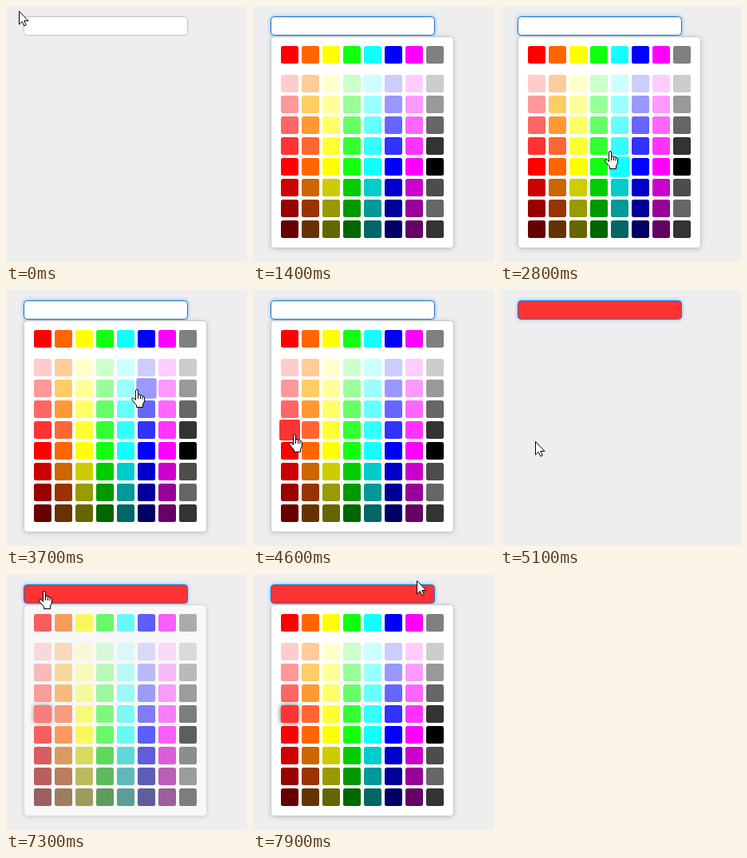
An HTML page with a canvas that plays this animation: 302 by 320 pixels, repeating every 8 s.

```html
<!DOCTYPE html>
<html lang="en">
<head>
<meta charset="utf-8">
<title>Colour picker</title>
<style>
  html, body { margin: 0; width: 100%; height: 100%; overflow: hidden; background: #eee; }
  canvas { display: block; width: 302px; height: 320px; }
</style>
</head>
<body>
<canvas id="stage" width="302" height="320"></canvas>
<script>
const W = 302, H = 320, LOOP = 8000, STEP = 100, CELL = 22, PITCH = 26;
const PICK = 4800, BLUR = 5300, REFOCUS = 6900;
const stage = document.getElementById('stage').getContext('2d');
const layer = new OffscreenCanvas(W, H).getContext('2d');

// Channels in fifths of full strength.
const HUES = [[5, 0, 0], [5, 2, 0], [5, 5, 0], [.35, 5, .35], [.35, 5, 5], [0, 0, 5], [5, 0, 5]];
const rgb = levels => `rgb(${levels.map(v => Math.round(v * 51))})`;

// Positive tone lightens towards white, negative darkens.
function toned(base, tone, lift) {
  if (tone < 0) return Math.round(base * (5 + tone) / 5);
  if (base < 1) return Math.max(base, Math.round(tone * lift));
  return Math.min(5, Math.floor(base + tone * .67));
}

function colorOf(col, row) {
  const tone = row ? 5 - row : 0;
  const hue = HUES[col];
  if (hue) return rgb(hue.map(base => toned(base, tone, hue[1] === 2 ? .7 : 1)));
  const grey = !row ? 2.5 : tone < 0 ? [1.5, 2, 1][-1 - tone] : tone;
  return rgb([grey, grey, grey]);
}

const cells = Array.from({ length: 72 }, (_, i) => {
  const col = i % 8, row = Math.floor(i / 8);
  return {
    x: 35 + col * PITCH,
    y: row ? 60 + row * PITCH : 50,
    color: colorOf(col, row),
    pickable: row === 4 && col === 0
  };
});

// Pointer journeys: [time, x, y]; the pointer is away between them.
const tracks = [
  [[0, 16, 6], [400, 42, 18], [1100, 80, 18]],
  [[1700, 2, 272], [2200, 150, 240], [2780, 147, 196], [2800, 137, 181],
   [3500, 176, 118], [4500, 51, 180], [5000, 51, 180], [5500, -14, 262]],
  [[6400, 13, 27], [6800, 47, 21], [7300, 47, 21], [7900, 205, 8], [8000, 205, 8]]
];

const clamp = v => Math.max(0, Math.min(1, v));
const ease = u => u * u * (3 - 2 * u);
const inside = (p, x, y, w, h) => p.x >= x && p.x < x + w && p.y >= y && p.y < y + h;

function pointerAt(t) {
  const track = tracks.find(k => t >= k[0][0] && t < k[k.length - 1][0]);
  if (!track) return null;
  const i = track.findIndex(k => k[0] > t);
  const [t0, x0, y0] = track[i - 1], [t1, x1, y1] = track[i];
  const u = ease((t - t0) / (t1 - t0));
  return { x: Math.round(x0 + (x1 - x0) * u), y: Math.round(y0 + (y1 - y0) * u) };
}

const fadeIn = (t, from) => clamp((t - from) / 150);
const popupAlpha = t => t < REFOCUS ? fadeIn(t, 710) * (1 - fadeIn(t, 4910)) : fadeIn(t, 7210);

// Share of the last moments spent over the cell.
function hoverAmount(cell, trail) {
  return trail.filter(p => p && inside(p, cell.x, cell.y, CELL, CELL)).length / trail.length;
}

function shadow(ctx, color, blur, dy = 0) {
  ctx.shadowColor = color;
  ctx.shadowBlur = blur;
  ctx.shadowOffsetY = dy;
}

// Filled rounded box with an optional [color, blur, dy] shadow and a border.
function drawBox(ctx, x, y, w, h, r, fill, shade, border) {
  ctx.save();
  ctx.beginPath();
  ctx.roundRect(x, y, w, h, r);
  ctx.fillStyle = fill;
  if (shade) shadow(ctx, ...shade);
  ctx.fill();
  shadow(ctx, 'transparent', 0);
  if (border) {
    ctx.strokeStyle = border;
    ctx.stroke();
  }
  ctx.restore();
}

function drawInput(color, focused) {
  const shade = focused ? ['rgba(70,165,255,.95)', 5] : ['rgba(0,0,0,.16)', 2];
  drawBox(stage, 22.5, 13.5, 205, 23, 4, color, shade, focused ? '#1c74d0' : '#c8c8c8');
}

function drawPopup(t, alpha) {
  layer.clearRect(0, 0, W, H);
  drawBox(layer, 22.5, 38.5, 229, 264, 4, '#fff', ['rgba(0,0,0,.2)', 7, 1], '#c8c8c8');
  const trail = [0, 20, 40, 60, 80, 100].map(d => pointerAt(t - d));
  cells.map(cell => ({ cell, grow: hoverAmount(cell, trail) }))
    .sort((a, b) => a.grow - b.grow)
    .forEach(({ cell, grow }) => {
      const out = 2 * grow, size = CELL + 2 * out;
      const shade = cell.pickable && t >= PICK && ['rgba(0,0,0,.65)', 6];
      drawBox(layer, cell.x - out, cell.y - out, size, size, 2.5, cell.color, shade);
    });
  stage.globalAlpha = alpha;
  stage.drawImage(layer.canvas, 0, 0);
  stage.globalAlpha = 1;
}

const arrow = new Path2D('M.5 .5V17L4.3 13.4 6.8 18.8 9.2 17.8 6.8 12.5H12Z');
const hand = new Path2D('M5.5 13.5V2Q5.5 .5 7 .5T8.5 2V8Q8.5 6.5 10 6.5T11.5 8.3Q11.5 7.4 12.8 7.4T14 9.2' +
  'Q14 8.7 15.2 8.9T16.5 11V15L14.5 19V22.5H6.5V20L3 16 .7 12.8Q.4 10.8 2.2 10.9Q3.5 11 5.5 13.5Z');
const knuckles = new Path2D('M8.5 8V12M11.5 8.5V12M14 9.5V12.5');

function drawPointer(p, open) {
  const pointing = inside(p, 22, 13, 206, 24) || (open && inside(p, 22, 38, 230, 265));
  const shape = pointing ? hand : arrow;
  stage.save();
  stage.translate(p.x - (pointing ? 6 : 0), p.y);
  stage.fillStyle = '#fff';
  stage.strokeStyle = '#000';
  stage.lineJoin = 'round';
  stage.fill(shape);
  stage.stroke(shape);
  if (pointing) stage.stroke(knuckles);
  stage.restore();
}

function draw(t) {
  stage.fillStyle = '#eee';
  stage.fillRect(0, 0, W, H);
  const alpha = popupAlpha(t), p = pointerAt(t);
  drawInput(t >= PICK ? '#f33' : '#fff', (t >= 500 && t < BLUR) || t >= REFOCUS);
  if (alpha > 0) drawPopup(t, alpha);
  if (p) drawPointer(p, alpha > 0);
}

const start = performance.now();
function tick() {
  const t = (performance.now() - start) % LOOP;
  draw(Math.floor(t / STEP) * STEP);
  requestAnimationFrame(tick);
}
tick();
</script>
</body>
</html>
```
